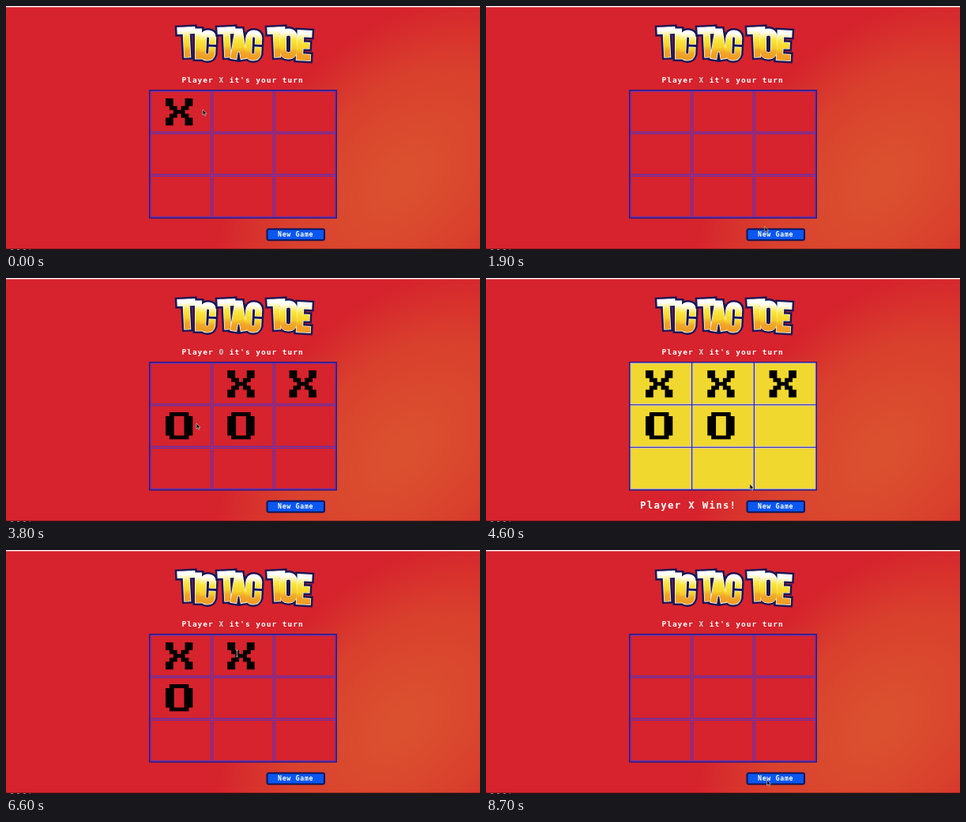
Write an HTML page that moves like this. It is 600 px wide and 309 px high and loops after 8.8 s.

```html
<!DOCTYPE html>
<html lang="en">
<head>
<meta charset="utf-8">
<title>Tic Tac Toe</title>
<style>
html, body { margin: 0; width: 100%; height: 100%; overflow: hidden; background: #d6232d; }
svg { display: block; width: 100%; height: 100%; }
text { font-family: "DejaVu Sans Mono", monospace; font-weight: 700; fill: #fff; white-space: pre; }
#turn { font-size: 9.5px; letter-spacing: .98px; }
#result { font-size: 12.4px; letter-spacing: 1.28px; }
#label { font-size: 8.3px; letter-spacing: .66px; }
#mark { fill: #c3d9d3; }
#title { fill: none; stroke-linecap: square; }
#frame { fill: #d6232d; stroke: #1f1a8e; stroke-width: 1.6; }
#cells { fill: none; stroke: #5433c6; stroke-width: 1.1; }
.won #frame { fill: #2a22a0; }
.won #cells { fill: #f1d82f; stroke: #cfc6b8; }
</style>
</head>
<body>
<svg viewBox="0 0 600 309" preserveAspectRatio="none">
  <defs>
    <radialGradient id="glow" gradientUnits="userSpaceOnUse" r="1"
      gradientTransform="translate(500 220) rotate(-45) scale(280 180)" cx="0" cy="0">
      <stop offset=".1" stop-color="#db502f"/>
      <stop offset=".6" stop-color="#d9402d"/>
      <stop offset="1" stop-color="#d6232d"/>
    </radialGradient>
    <linearGradient id="gold" gradientUnits="userSpaceOnUse" x1="0" y1="-4" x2="0" y2="34">
      <stop offset=".1" stop-color="#fff"/>
      <stop offset=".36" stop-color="#fbe640"/>
      <stop offset=".62" stop-color="#f6d22a"/>
      <stop offset=".78" stop-color="#f0a426"/>
      <stop offset="1" stop-color="#ee9a22"/>
    </linearGradient>
    <path id="X" d="M0 0h2v2h1v1h1v-1h1v-2h2v2h-1v1h-1v1h1v1h1v2h-2v-2h-1v-1h-1v1h-1v2h-2v-2h1v-1h1v-1h-1v-1h-1z"/>
    <path id="O" fill-rule="evenodd" d="M1 0h5v1h1v5h-1v1h-5v-1h-1v-5h1zM2.2 1v5h2.6v-5z"/>
  </defs>

  <rect width="600" height="309" fill="url(#glow)"/>
  <rect width="600" height="1.4" fill="#fff"/>
  <rect y="307.6" width="600" height="1.4" fill="#1b0d10"/>
  <path d="M6 308.5H31" stroke="#a99" stroke-dasharray="3 5" stroke-width=".8"/>

  <g id="title" role="img" aria-label="Tic Tac Toe"></g>
  <text id="turn" x="222.5" y="97">Player <tspan id="mark">X</tspan> it's your turn</text>

  <g id="board">
    <rect id="frame" x="181.8" y="106.8" width="236.4" height="161.6"/>
    <g id="cells"></g>
    <g id="marks"></g>
  </g>

  <text id="result" x="195" y="292"></text>
  <rect x="330.5" y="282.5" width="72.5" height="14" rx="2" fill="#0b57f2" stroke="#0d1558" stroke-width="2"/>
  <text id="label" x="344" y="292.2">New Game</text>

  <g id="cursor">
    <path id="arrow" d="M0 0V7L1.6 5.6L2.8 8.2L4 7.6L2.9 5.2H5Z" fill="#111" stroke="#ddd" stroke-width=".6"/>
    <path id="beam" d="M-1.5 -4H1.5M0 -4V4M-1.5 4H1.5" fill="none" stroke="#c9c9c0" stroke-width=".9"/>
  </g>
</svg>
<script>
const LOOP = 8800, STEP = 100, REST = 100, TRAVEL = 700;
const $ = id => document.getElementById(id);
const grid = build => Array.from({ length: 9 }, (_, i) => build(i % 3, Math.floor(i / 3))).join("");

// Title letters: centreline and distance to the next letter
const letters = {
  T: ["M-7 0H7M0 0V30", 15.5],
  I: ["M0 0V30", 12.5],
  C: ["M6 9V5Q5 0 0 0Q-6 0 -6 7V23Q-6 30 0 30Q5 30 6 25V21", 0],
  A: ["M-6 30L-1 0H1L6 30M-3 21H3", 19.5],
  O: ["M0 0Q-7 0 -7 8V22Q-7 30 0 30Q7 30 7 22V8Q7 0 0 0Z", 20.5],
  E: ["M5 0H-5V30H5M-5 15H3", 0]
};

function drawWord(word, x) {
  const placed = [...word].map((letter, i) => {
    const [d, advance] = letters[letter];
    const path = `<path d="${d}" transform="translate(${x} ${31 + i * 2}) rotate(${i * 3 - 3})"/>`;
    x += advance;
    return path;
  }).join("");
  return [["#1d1655", 14], ["#fff", 9], ["url(#gold)", 7.6]].map(([color, width]) =>
    `<g stroke="${color}" stroke-width="${width}">${placed}</g>`).join("");
}

$("title").innerHTML = drawWord("TIC", 228) + drawWord("TAC", 279) + drawWord("TOE", 342);
$("cells").innerHTML = grid((col, row) =>
  `<rect x="${183.1 + col * 78.7}" y="${108 + row * 53.7}" width="76.4" height="51.6"/>`);

// Each game plays its cells in order at a steady pace, then clears the board
const games = [
  { start: 0, pace: 350, order: "03142", clear: 1700, aim: 30 },
  { start: 2400, pace: 460, order: "14230", clear: 4700, aim: 22 },
  { start: 5600, pace: 480, order: "031475", clear: 8700, aim: -5 }
];
const lines = ["012", "345", "678", "036", "147", "258", "048", "246"];
const markX = cell => 202 + cell % 3 * 78.3;
const markY = cell => 117 + Math.floor(cell / 3) * 53;

const clicks = games.flatMap(({ start, pace, order, clear, aim }) => [
  ...[...order].map((cell, i) => ({ at: start + i * pace, x: markX(cell) + 17 + aim, y: markY(cell) + 14 })),
  { at: clear, x: 355.5, y: 291 }
]);

function gameAt(time) {
  const game = games.find(g => time >= g.start && time < g.clear);
  const count = game ? Math.min(game.order.length, Math.floor((time - game.start) / game.pace) + 1) : 0;
  const cells = Array(9).fill("");
  for (let i = 0; i < count; i++) cells[game.order[i]] = "XO"[i % 2];
  const line = lines.find(([a, b, c]) => cells[a] && cells[a] === cells[b] && cells[a] === cells[c]);
  return { cells, count, winner: line ? cells[line[0]] : "" };
}

function pointerAt(time) {
  const from = clicks.findLast(c => c.at <= time);
  const to = clicks.find(c => c.at > time) || from;
  const span = Math.min(TRAVEL, to.at - from.at - REST);
  const p = Math.min(1, Math.max(0, (time - from.at - REST) / span));
  const k = p * p * (3 - 2 * p);
  return [from.x + (to.x - from.x) * k, from.y + (to.y - from.y) * k];
}

function draw(time) {
  const { cells, count, winner } = gameAt(time);
  // The turn line follows a move one step later and freezes on a win
  const turn = winner || (count ? "XO"[gameAt(time - STEP).count % 2] : "X");
  $("mark").textContent = turn;
  $("result").textContent = winner && `Player ${winner} Wins!`;
  $("board").classList.toggle("won", !!winner);
  $("marks").innerHTML = cells.map((m, i) => m &&
    `<use href="#${m}" transform="translate(${markX(i)} ${markY(i)}) scale(4.9)"/>`).join("");

  const [x, y] = pointerAt(time);
  const overMark = cells.some((m, i) => m &&
    Math.abs(x - markX(i) - 17) < 18 && Math.abs(y - markY(i) - 17) < 18);
  $("cursor").setAttribute("transform", `translate(${x} ${y})`);
  $("arrow").style.display = overMark ? "none" : "";
  $("beam").style.display = overMark ? "" : "none";
}

const start = performance.now();
let shown = -1;
function tick() {
  const elapsed = Math.max(0, performance.now() - start) % LOOP;
  const time = Math.floor(elapsed / STEP) * STEP;
  if (time !== shown) draw(shown = time);
  requestAnimationFrame(tick);
}
tick();
</script>
</body>
</html>
```
